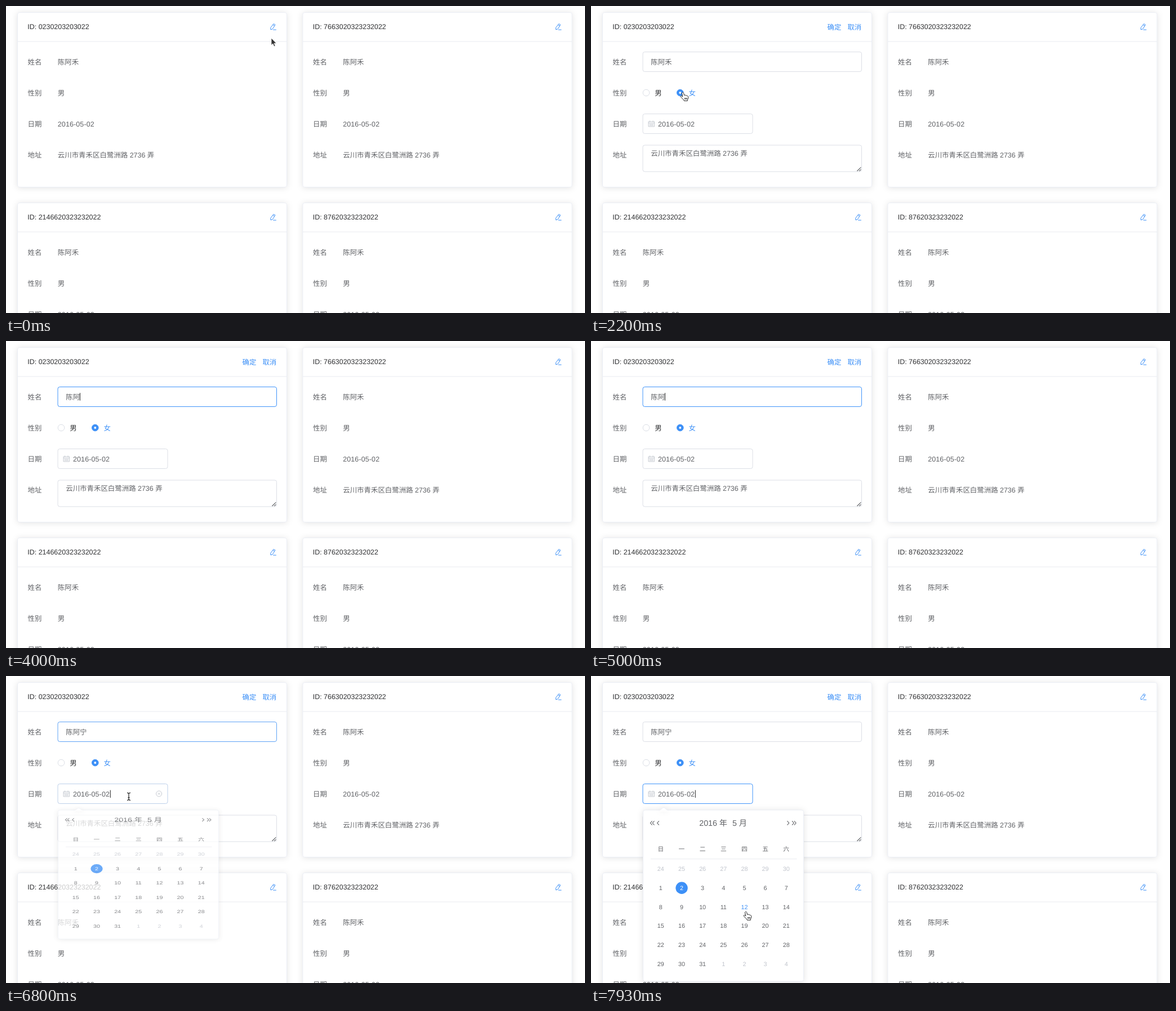
Write an HTML page that moves like this. It is 1028 px wide and 545 px high and loops after 8 s.

```html
<!DOCTYPE html>
<html lang="zh-CN">
<head>
<meta charset="utf-8">
<title>卡片编辑</title>
<style>
  html, body { margin: 0; width: 100%; height: 100%; overflow: hidden; background: #fff; }
  svg { display: block; width: 1028px; height: 545px; }
  text { font: 12.45px "Liberation Sans", "Noto Sans CJK SC", "Noto Sans CJK", sans-serif; fill: #606266;
    text-rendering: geometricPrecision; white-space: pre; }
  .id { fill: #303133; }
  .blue { fill: #3d90f7; }
  .medium { font-weight: 500; }
  .date { letter-spacing: .14px; }
  .small { font-size: 10.7px; text-anchor: middle; }
  .faint { fill: #c0c4cc; }
  .white { fill: #fff; }
  .title { font-size: 14.2px; font-weight: 500; }
  .card { fill: #fff; stroke: #ebeef5; filter: drop-shadow(0 1.8px 5.4px rgba(0,0,0,.11)); }
  .field { fill: #fff; stroke: #dcdfe6; }
  .rule { fill: none; stroke: #e9ebf0; }
  .line { fill: none; stroke: #606266; stroke-width: 1.1; }
  .icon { fill: none; stroke: #3d90f7; }
  .gray { fill: none; stroke: #c0c4cc; stroke-width: .9; }
  .caret { fill: #222; }
</style>
</head>
<body>
<script>
const LOOP = 8000, FPS = 15;
const NAME = "陈阿禾", ADDRESS = "云川市青禾区白鹭洲路 2736 弄", DATE = "2016-05-02";
const EDIT = 400, PICK_SEX = 1700, FOCUS = 3130, ERASE = 3730, TYPE = 5400, OPEN = 6729;
const HIDE = [ERASE, 6130];
const BLUE = [64, 148, 250], GRAY = [220, 223, 230];
const COL = 37.15, ROW = 33.75;

// Pointer stops: time, x, y
const path = [
  [0, 471, 57], [220, 474, 38], [460, 474, 38], [930, 225, 165], [1450, 163, 154],
  [2330, 163, 154], [2900, 222, 101], [6200, 222, 101], [6550, 218, 214],
  [6930, 218, 214], [7600, 275, 419], [8000, 275, 419]
];

function el(parent, tag, attrs = {}, content) {
  const node = document.createElementNS("http://www.w3.org/2000/svg", tag);
  for (const key in attrs) node.setAttribute(key, attrs[key]);
  if (content !== undefined) node.textContent = content;
  return parent.appendChild(node);
}
const group = parent => el(parent, "g");
const shape = (parent, d, cls) => el(parent, "path", { d, class: cls });
const rect = (parent, x, y, width, height, cls, rx = 3.5) =>
  el(parent, "rect", { x, y, width, height, rx, class: cls });
// y is the vertical middle of the line
const label = (parent, x, y, content, cls = "", drop = 4.6) =>
  el(parent, "text", { x, y: y + drop, class: cls }, content);
const show = (node, on) => node.setAttribute("display", on ? "inline" : "none");

function drawPencil(parent) {
  shape(parent, "M475.1 31.6L478 33.3 473.4 40.7 470 42 469.7 38.6ZM473.7 33.5L476.9 35.4M474.2 42.2H479.8", "icon");
}

function drawCard(x, y, id) {
  const card = el(svg, "g", { transform: `translate(${x} ${y})` });
  rect(card, 20.5, 11.5, 478, 310, "card");
  shape(card, "M20.5 63H498.5", "rule");
  label(card, 38.3, 37, "ID: " + id, "id", 4.4);
  ["姓名", "性别", "日期", "地址"].forEach((s, i) => label(card, 38.6, 99 + i * 55.2, s));
  const view = group(card);
  [NAME, "男", DATE, ADDRESS].forEach((s, i) =>
    label(view, 91.8, 99 + i * 55.2, s, i === 2 ? "date" : ""));
  drawPencil(view);
  return { card, view };
}

function drawRadio(parent, x, content) {
  const ring = el(parent, "circle", { cx: x, cy: 154, r: 5.8 });
  el(parent, "circle", { cx: x, cy: 154, r: 1.9, class: "white" });
  const text = label(parent, x + 15.3, 154, content);
  return on => {
    ring.setAttribute("fill", on ? "#3d90f7" : "#fff");
    ring.setAttribute("stroke", on ? "#3d90f7" : "#dcdfe6");
    text.setAttribute("class", on ? "medium blue" : "medium id");
  };
}

function drawForm(parent) {
  const g = group(parent);
  label(g, 419.6, 37, "确定", "blue medium");
  label(g, 455.4, 37, "取消", "blue medium");
  const nameBox = rect(g, 92, 81.5, 388.5, 35, "field");
  const name = label(g, 106.2, 99, NAME);
  const male = drawRadio(g, 98, "男"), female = drawRadio(g, 158.3, "女");
  const dateBox = rect(g, 92, 191.5, 195, 35, "field");
  shape(g, "M102 205.2H112.6V214H102ZM102 207.8H112.6M104.5 203.6V206M110 203.6V206M103.6 210H111M103.6 212H111", "gray");
  label(g, 119, 209.4, DATE, "date");
  const clear = shape(g, "M266.6 209a5 5 0 1 0 10 0a5 5 0 1 0-10 0M269.8 207.2l3.6 3.6m0-3.6l-3.6 3.6", "gray");
  rect(g, 92, 247, 388.5, 47, "field");
  label(g, 106.2, 261, ADDRESS);
  shape(g, "M472.5 293L479.3 286.4M476.3 293L479.3 290.2", "line");
  const caret = rect(g, 0, 0, 1, 13.5, "caret", 0);
  return { g, nameBox, name, male, female, dateBox, clear, caret };
}

function drawPicker(parent) {
  const g = group(parent), cells = [];
  rect(g, 92.5, 238, 285, 304, "card");
  shape(g, "M122.6 238.6L127.6 233.8Q129 232.7 130.4 233.8L135.4 238.6", "card");
  rect(g, 122, 238.5, 14, 2, "white", 0);
  shape(g, "M108.6 257.3l-3.2 3.7 3.2 3.7M112.4 257.3l-3.2 3.7 3.2 3.7M120.8 257.3l-3.2 3.7 3.2 3.7" +
    "M348.4 257.3l3.2 3.7-3.2 3.7M357 257.3l3.2 3.7-3.2 3.7M360.8 257.3l3.2 3.7-3.2 3.7", "line");
  label(g, 192.3, 261, "2016 年", "title", 5.2);
  label(g, 251, 261, "5 月", "title", 5.2);
  [..."日一二三四五六"].forEach((s, i) => label(g, 123.8 + i * COL, 307, s, "small", 4));
  shape(g, "M106 324.8H365.5", "rule");
  el(g, "circle", { cx: 161, cy: 376.2, r: 10.7, class: "blue" });
  for (let i = 0; i < 42; i++) {
    const day = i < 7 ? 24 + i : (i - 7) % 31 + 1;
    const cls = "small " + (i === 8 ? "white" : i < 7 || i > 37 ? "faint" : "");
    const node = label(g, 123.8 + i % 7 * COL, 342.4 + Math.floor(i / 7) * ROW, day, cls, 3.8);
    cells.push({ node, cls, live: i > 6 && i < 38 && i !== 8 });
  }
  return { g, cells };
}

function drawPointers(parent) {
  const style = (d, fill, stroke, width) =>
    el(parent, "path", { d, fill, stroke, "stroke-width": width, "stroke-linejoin": "round" });
  const beam = group(parent);
  const bar = "M-3-6.6Q0-6.6 0-4.6Q0-6.6 3-6.6M0-5V5M-3 6.6Q0 6.6 0 4.6Q0 6.6 3 6.6M-1.6 1.8H1.6";
  el(beam, "path", { d: bar, fill: "none", stroke: "#fff", "stroke-width": 2.6 });
  el(beam, "path", { d: bar, fill: "none", stroke: "#222", "stroke-width": 1.2 });
  return {
    arrow: style("M0 0V12.6L2.9 9.9 5 14.8 7.1 13.9 5.1 9.2H9Z", "#333", "#fff", .8),
    hand: style("M-1.6 1C-1.7-.9.9-1.4 1.4.4L2.6 4.6C3.3 3.8 5 3.9 5.2 5 6 4.4 7.3 4.8 7.5 5.8 8.5 5.3 9.6 6 9.7 7.2" +
      " 9.9 9.5 9.4 11 8.4 12.3L8.3 14.3H2.2L1.8 12.8C0 11.3-1.6 9.6-3.6 7.4-4.6 6.1-3 4.9-1.8 5.9L-.2 7.1Z" +
      "M3.6 9V11.8M5.4 9V11.8M7.2 9V11.8", "#fff", "#222", 1),
    beam
  };
}

// CSS cubic-bezier, solved by bisection
function bezier(x1, y1, x2, y2) {
  const at = (a, b, s) => 3 * a * s * (1 - s) ** 2 + 3 * b * s * s * (1 - s) + s ** 3;
  return x => {
    if (x <= 0 || x >= 1) return x <= 0 ? 0 : 1;
    let lo = 0, hi = 1;
    for (let i = 0; i < 24; i++) {
      const mid = (lo + hi) / 2;
      if (at(x1, x2, mid) < x) lo = mid; else hi = mid;
    }
    return at(y1, y2, lo);
  };
}
const zoom = bezier(.23, 1, .32, 1), fade = bezier(.645, .045, .355, 1);
const glide = bezier(.4, 0, .3, 1);
const mix = k => `rgb(${GRAY.map((c, i) => c + (BLUE[i] - c) * k)})`;

function pointerAt(t) {
  const i = Math.max(1, path.findIndex(p => p[0] > t));
  const [t0, x0, y0] = path[i - 1], [t1, x1, y1] = path[i];
  const k = glide((t - t0) / (t1 - t0));
  return [x0 + (x1 - x0) * k, y0 + (y1 - y0) * k];
}

const svg = el(document.body, "svg", { viewBox: "0 0 1028 545" });
const first = drawCard(0, 0, "0230203203022");
drawCard(506.4, 0, "7663020323232022");
drawCard(0, 338, "2146620323232022");
drawCard(506.4, 338, "87620323232022");
const form = drawForm(first.card);
const picker = drawPicker(svg);
const mouse = group(svg), pointers = drawPointers(mouse);

function render(t) {
  const editing = t >= EDIT, open = t >= OPEN;
  const [x, y] = pointerAt(t);
  const inside = (l, top, r, b) => x > l && x < r && y > top && y < b;

  show(first.view, !editing);
  show(form.g, editing);
  form.male(t < PICK_SEX);
  form.female(t >= PICK_SEX);
  form.name.textContent = t < ERASE ? NAME : t < TYPE ? "陈阿" : "陈阿宁";
  form.nameBox.style.stroke = mix(fade((t - FOCUS) / 200) - fade((t - OPEN) / 200));
  form.dateBox.style.stroke = mix(fade((t - OPEN) / 200));

  const last = [OPEN, TYPE, ERASE, FOCUS].find(s => t >= s);
  show(form.caret, last !== undefined && (t - last) % 1000 < 500);
  form.caret.setAttribute("x", open ? 184.8 : 106 + 12.45 * (t >= ERASE && t < TYPE ? 2 : 3));
  form.caret.setAttribute("y", open ? 202.6 : 92.2);

  const k = zoom((t - OPEN) / 300);
  show(picker.g, open);
  picker.g.setAttribute("opacity", k);
  picker.g.setAttribute("transform", `translate(0 ${238 * (1 - k)}) scale(1 ${k})`);
  const onDays = open && inside(105.2, 325.5, 365.2, 528);
  const hover = onDays ? Math.floor((y - 325.5) / ROW) * 7 + Math.floor((x - 105.2) / COL) : -1;
  picker.cells.forEach((c, i) =>
    c.node.setAttribute("class", i === hover && c.live ? "small blue" : c.cls));

  const onDate = editing && inside(92, 191, 287, 227);
  show(form.clear, onDate);
  const onText = onDate || editing && inside(92, 81, 481, 117);
  const onLink = editing ? inside(419, 30, 480, 44) || inside(91, 147, 187, 161) : inside(467, 30, 481, 44);
  const kind = onDays || onLink ? "hand" : onText ? "beam" : "arrow";
  for (const key in pointers) show(pointers[key], key === kind);
  show(mouse, t < HIDE[0] || t >= HIDE[1]);
  mouse.setAttribute("transform", `translate(${x} ${y})`);
}

function tick() {
  const t = performance.now() % LOOP;
  render(Math.floor(t * FPS / 1000 + .1) * 1000 / FPS % LOOP);
  requestAnimationFrame(tick);
}
tick();
</script>
</body>
</html>
```
